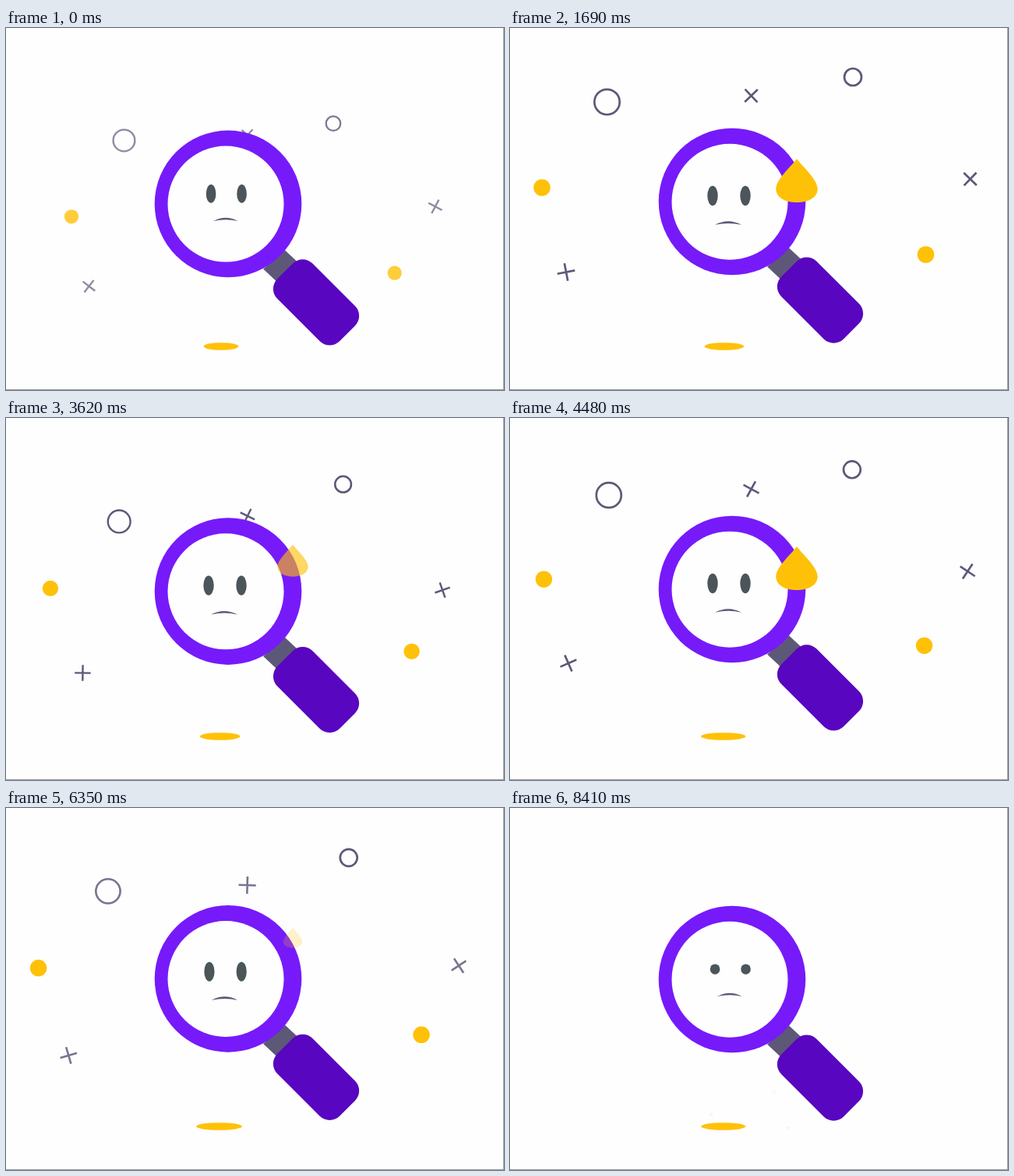
Recreate the animation shown at these times as an HTML page with a canvas. Size 639 px wide and 465 px high, loop 8.43 s.

```html
<!DOCTYPE html>
<html>
<head>
<meta charset="utf-8">
<style>
html, body { margin: 0; height: 100%; overflow: hidden; background: #fefefe; }
canvas { display: block; }
</style>
</head>
<body>
<canvas id="stage" width="639" height="465"></canvas>
<script>
const ctx = document.getElementById('stage').getContext('2d');
const LOOP = 8430, CYCLE = 2950, BOB = CYCLE / 3;
const PURPLE = '#761afa', DARK = '#5806bf', GREY = '#5e5878', YELLOW = '#ffc107', PAPER = '#fefefe';

// The picture advances in held steps of about 140 ms.
const BEATS = [150, 1270, 2370, 3490, 4610, 5690, 6760, 7840, 8980];
function heldTime(t) {
  const i = BEATS.findIndex(b => b > t) - 1;
  if (i < 0) return 0;
  const step = (BEATS[i + 1] - BEATS[i]) / 8;
  return BEATS[i] + Math.min(7, Math.floor((t - BEATS[i] + 15) / step)) * step;
}

const clamp = x => Math.max(0, Math.min(1, x));
const mix = (a, b, k) => a + (b - a) * k;
const smooth = x => (1 - Math.cos(Math.PI * clamp(x))) / 2;

function track(keys, t, ease = smooth) {
  let prev = keys[0];
  for (const key of keys) {
    if (t < key[0]) return mix(prev[1], key[1], ease(clamp((t - prev[0]) / (key[0] - prev[0]))));
    prev = key;
  }
  return prev[1];
}

const DOTS = {
  scale: [[0, 0], [60, .2], [250, 1.05], [500, .842], [730, 1.08], [950, .998], [1170, .941], [1400, 1.02], [1900, .986], [2190, 1]],
  alpha: [[0, 0], [60, .13], [500, .8], [650, 1]]
};
const CROSSES = {
  scale: [[80, 0], [280, 1.05], [500, .857], [740, 1.1], [950, .966], [1170, .89], [1500, 1], [1900, .981], [2190, 1]],
  alpha: [[80, 0], [500, .7], [950, .83], [1170, 1]]
};

function place(x, y, scale, draw, angle = 0) {
  ctx.save();
  ctx.translate(x, y);
  ctx.rotate(angle * Math.PI / 180);
  ctx.scale(scale, scale);
  draw();
  ctx.restore();
}

function ellipse(x, y, rx, ry, color) {
  ctx.fillStyle = color;
  ctx.beginPath();
  ctx.ellipse(x, y, rx, ry, 0, 0, 7);
  ctx.fill();
}
const disc = (x, y, r, color) => ellipse(x, y, r, r, color);

function fillPath(d, color) {
  ctx.fillStyle = color;
  ctx.fill(new Path2D(d));
}

function strokePath(d) {
  ctx.strokeStyle = GREY;
  ctx.lineWidth = 2.7;
  ctx.stroke(new Path2D(d));
}

function ring(x, y, r) {
  strokePath(`M${x + r} ${y}a${r} ${r} 0 1 0 ${-2 * r} 0a${r} ${r} 0 1 0 ${2 * r} 0`);
}

function cross(x, y, angle) {
  place(x, y, 1, () => strokePath('M-11.5 0H11.5M0 -11.5V11.5'), angle);
}

function burst(group, t, draw) {
  ctx.globalAlpha = track(group.alpha, t, x => x);
  place(313, 441, track(group.scale, t), draw);
  ctx.globalAlpha = 1;
}

function particles(t) {
  burst(DOTS, t, () => {
    disc(-272, -236, 10.8, YELLOW);
    disc(220.5, -150, 10.8, YELLOW);
    ring(127, -378, 11);
  });
  burst(CROSSES, t, () => {
    ring(-188.5, -346, 16.2);
    cross(-241, -127.5, .078 * (t - 1170));
    cross(-3.5, -354, 25 + .11 * (t - 1170));
    cross(277.5, -247, .063 * (t - 1170) - 20);
  });
}

function face(t) {
  const k = smooth((t - 600) / 570);
  const eyeHeight = t < 200 ? 12.7 * Math.max(.08, Math.abs(t - 110) / 90) : 12.7;
  place(mix(282.8, 281, k), mix(81.5, 87, k), mix(.94, 1, k), () => {
    for (const x of [-21, 21]) ellipse(x, 0, 6.7, Math.min(12.7, eyeHeight), '#4b555a');
    fillPath('M-18 37.3Q-1 28.3 16 37.3Q-1 33.5 -18 37.3', GREY);
  });
}

function drop(t) {
  const k = clamp((t - 840) / 550);
  ctx.globalAlpha = k;
  place(368, 20, mix(.31, 1, k), () => fillPath(
    'M0 19.5C6 28 26.7 46 26.7 58C26.7 70 14 75.5 0 75.5C-14 75.5 -26.7 70 -26.7 58C-26.7 46 -6 28 0 19.5', YELLOW));
  ctx.globalAlpha = 1;
}

function magnifier(t) {
  fillPath('M358 154L373 168L347 194L330 178Z', GREY);
  place(398, 221, 1, () => {
    ctx.fillStyle = DARK;
    ctx.beginPath();
    ctx.roundRect(-56.5, -32, 113, 64, 18);
    ctx.fill();
  }, 45);
  disc(285, 94.5, 94.3, PURPLE);
  disc(282, 94.7, 74.5, PAPER);
  face(t);
  drop(t);
}

function render(time) {
  const t = heldTime(time % LOOP);
  const phase = (t + 500) % CYCLE;
  const bob = Math.cos(2 * Math.PI * (t - 930) / BOB);

  ctx.fillStyle = PAPER;
  ctx.fillRect(0, 0, 639, 465);
  particles(phase);
  ellipse(274.75 + 1.25 * bob, 409, 25.75 - 3.75 * bob, 4.8, YELLOW);
  place(0, 128.2 + 3.4 * bob, 1, () => magnifier(phase));

  ctx.fillStyle = '#999';
  ctx.fillRect(638, 0, 1, 465);
  ctx.fillRect(0, 464, 639, 1);
}

const start = performance.now();
function tick() {
  render(performance.now() - start);
  requestAnimationFrame(tick);
}
tick();
</script>
</body>
</html>
```
